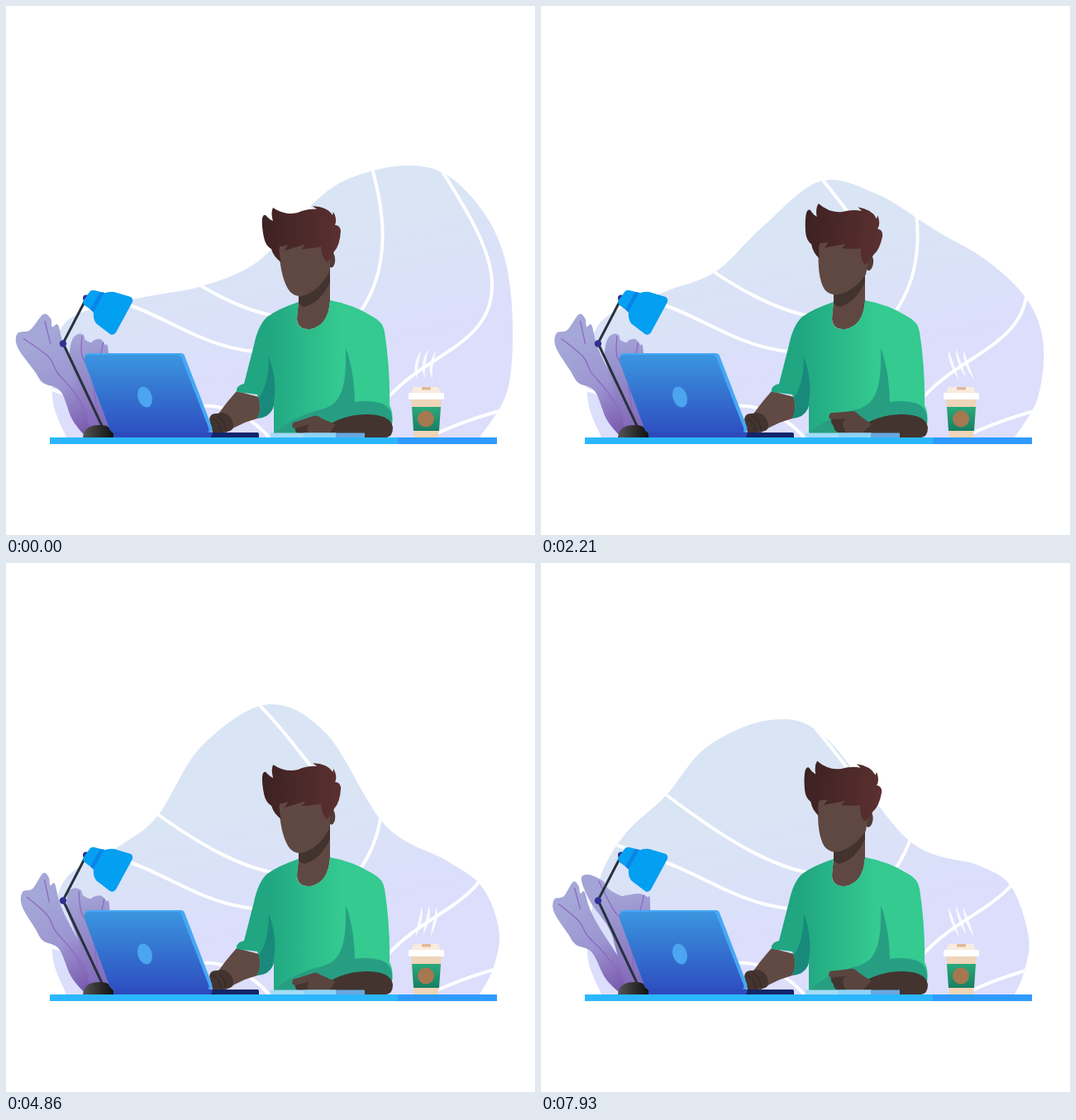
Recreate the animation shown at these times as an HTML page. Size 640 by 640 pixels, loop 8 s.

```html
<!DOCTYPE html>
<html lang="en">
<head>
<meta charset="utf-8">
<title>At the desk</title>
<style>
html, body { margin: 0; width: 100%; height: 100%; overflow: hidden; background: #fff; }
svg { display: block; width: 100%; height: 100%; }
</style>
</head>
<body>
<svg viewBox="0 0 640 640">
  <defs>
    <linearGradient id="sky" gradientUnits="userSpaceOnUse" x1="290" y1="280" x2="330" y2="450">
      <stop offset="0" stop-color="#d9e5f4"/><stop offset="1" stop-color="#dcdefc"/>
    </linearGradient>
    <linearGradient id="leafA" gradientUnits="userSpaceOnUse" x1="35" y1="410" x2="105" y2="510">
      <stop offset="0" stop-color="#a4a7d7"/><stop offset=".5" stop-color="#9c95d1"/><stop offset="1" stop-color="#7a59ae"/>
    </linearGradient>
    <linearGradient id="leafB" gradientUnits="userSpaceOnUse" x1="90" y1="400" x2="115" y2="515">
      <stop offset="0" stop-color="#a3a4d6"/><stop offset="1" stop-color="#8167b7"/>
    </linearGradient>
    <linearGradient id="lid" x1="0" y1="0" x2="0" y2="1">
      <stop offset="0" stop-color="#3b95df"/><stop offset="1" stop-color="#2e50c1"/>
    </linearGradient>
    <linearGradient id="shirt" gradientUnits="userSpaceOnUse" x1="315" y1="0" x2="405" y2="0">
      <stop offset="0" stop-color="#20a681"/><stop offset="1" stop-color="#34ca90"/>
    </linearGradient>
    <linearGradient id="hair"><stop offset="0" stop-color="#3d2122"/><stop offset="1" stop-color="#5b3030"/></linearGradient>
    <linearGradient id="base"><stop offset="0" stop-color="#555"/><stop offset=".6" stop-color="#292929"/><stop offset="1" stop-color="#111"/></linearGradient>
    <linearGradient id="sleeve" x1="0" y1="0" x2="0" y2="1"><stop offset="0" stop-color="#2ba97b"/><stop offset="1" stop-color="#187f62"/></linearGradient>
    <clipPath id="clip"><path id="blob"/></clipPath>
  </defs>

  <g clip-path="url(#clip)">
    <rect width="640" height="522" fill="url(#sky)"/>
    <g fill="none" stroke="#fff" stroke-width="4">
      <path d="M70 335Q88 339 150 362C200 380 240 412 300 418"/>
      <path d="M140 272L151 280C210 325 270 365 325 375"/>
      <path d="M300 165C330 195 350 222 372 250"/>
      <path d="M441 190C462 260 462 320 430 368"/>
      <path d="M525 196C560 250 590 300 588 342C585 410 510 420 462 474"/>
      <path d="M515 520Q550 503 600 489"/>
      <path d="M50 463Q62 465 75 472M236 484C270 482 300 500 320 524"/>
    </g>
  </g>

  <path id="a" fill="url(#leafA)"/>
  <path id="b" fill="url(#leafB)"/>
  <path id="veins" fill="none" stroke="#8c68c2" stroke-width="1.3" stroke-linecap="round"/>

  <g>
    <path d="M117 510L69 408L97 354" fill="none" stroke="#28323d" stroke-width="3"/>
    <circle cx="69" cy="408.500" r="4.200" fill="#2f3192"/>
    <circle cx="97" cy="353.500" r="4" fill="#2f3192"/>
    <path d="M93 522Q94 507 113 507Q129 506 131 522Z" fill="url(#base)"/>
    <path d="M101 346Q103 343 107 344L119 347L106 370L95 362Q92 359 94 356Z" fill="#05a0f2"/>
    <path d="M114 346L120 347L106 371L102 367Z" fill="#0a83e8"/>
    <path d="M118 348Q124 345 131 346L151 352Q154 354 153 358L133 395Q130 399 126 397L109 384Q105 378 106 370Z" fill="#039ff0"/>
  </g>

  <g>
    <path d="M354 340L392 315V357Q390 387 368 391Q352 392 352 377L354 357Z" fill="#5f4842"/>
    <path d="M354 347Q380 345 392 318V334Q380 360 360 364L354 360Z" fill="#43332e"/>
    <path d="M279 466Q262 485 255 497Q248 510 266 516Q285 504 304 499Q310 490 306 473Z" fill="#614a43"/>
    <path d="M354 358Q330 366 316 376Q305 386 300 410L288 457Q278 459 279 467L304 470Q311 485 304 499Q318 497 324 484V517H392L400 505Q430 497 467 506Q469 492 464 483Q465 440 458 394Q456 382 444 376Q420 361 392 356Q390 387 368 391Q352 392 352 378Z" fill="url(#shirt)"/>
    <path d="M318 424Q327 450 325 470L323 487Q318 498 304 499Q310 488 306 474Q318 458 318 424Z" fill="#18897a"/>
    <path d="M411 414C412 455 408 480 385 487Q345 497 324 517H392L405 505Q440 490 467 506Q469 487 455 481Q440 476 422 479Q421 440 411 414Z" fill="#279e82"/>
    <path d="M246 500Q247 492 256 493Q264 490 271 497Q277 505 274 512Q270 517 250 516Z" fill="#43342f"/>
    <path d="M256 496Q265 501 266 513M250 499Q259 504 260 514" fill="none" stroke="#2f2421"/>
    <path d="M382 513Q403 495 435 494Q466 494 468 510Q468 521 460 522H400L384 518Z" fill="#43342f"/>
    <g id="hand">
      <path d="M349 495Q349 491 356 492L378 490Q382 491 385 495L400 506L388 517H363Q354 515 354 508Q350 504 351 500Q347 498 349 495Z" fill="#5a443e"/>
      <path d="M352 500L369 499Q361 505 370 517H363Q354 515 354 508Q350 504 352 500Z" fill="#43342f"/>
    </g>
    <g id="head">
      <ellipse cx="393.500" cy="307" rx="4.700" ry="9.500" fill="#503b36"/>
      <path d="M330 288Q331 325 341 342Q346 351 357 351Q377 347 391 322L393 298L385 282L345 280Z" fill="#5f4842"/>
      <path d="M310 257Q311 252 314 253Q318 258 323 260Q320 250 323 244Q338 254 353 250Q365 245 376 246L371 242Q389 243 395 253L396 249Q401 258 398 265Q404 265 405 272Q404 290 397 297Q394 306 388 310Q381 302 381 291Q374 293 358 294L362 288Q350 292 337 296L341 289Q335 291 331 291Q330 300 333 310Q324 304 321 294Q314 290 312 280Q309 265 310 257Z" fill="url(#hair)"/>
    </g>
  </g>

  <g>
    <path d="M101 420H211Q215 420 216 423L249 509Q251 516 244 516H132Q127 516 125 511L96 433Q92 420 101 420Z" fill="#46a8f5"/>
    <path d="M101 422H208Q211 422 212 425L245 510Q247 516 241 516H132Q127 516 125 511L96 433Q92 422 101 422Z" fill="url(#lid)"/>
    <ellipse cx="168" cy="473" rx="8.500" ry="12.800" transform="rotate(-18 168 473)" fill="#4ba5ef"/>
    <rect x="130" y="515.500" width="120" height="7" fill="#2d4bbd"/>
    <path d="M250 516H304Q306 516 306 518V522H248Z" fill="#14256a"/>
    <rect x="320" y="516.500" width="80" height="6" fill="#a3dcf7"/>
    <rect x="360" y="516.500" width="39" height="6" fill="#8ed3f7"/>
    <rect x="399" y="516.500" width="35" height="6" fill="#69a8e0"/>
  </g>

  <g>
    <path id="steam" fill="#fff" fill-opacity=".85"/>
    <path d="M490 475H527L523 522H494Z" fill="#efd5b9"/>
    <path d="M493 461H523L526 469H490Z" fill="#f9ebde"/>
    <rect x="503" y="461" width="11" height="3.500" rx="1" fill="#e2b797"/>
    <rect x="487" y="468" width="43" height="8" rx="1.500" fill="#fff"/>
    <path d="M491 485H526L524 514H493Z" fill="url(#sleeve)"/>
    <circle cx="508" cy="499.500" r="10" fill="#a67850"/>
  </g>
  <rect x="53" y="522" width="422" height="8" fill="#2bb7fd"/>
  <rect x="474" y="522" width="120" height="8" fill="#2e9bff"/>
</svg>
<script>
const LOOP = 8000, GROUND = 522;
const $ = id => document.getElementById(id);
const points = s => s.split(' ').map(p => p.split(',').map(Number));
const clamp = v => Math.max(0, Math.min(1, v));
const smooth = v => { v = clamp(v); return v * v * (3 - 2 * v); };
const mix = (p, q, k = 0.5) => [p[0] + (q[0] - p[0]) * k, p[1] + (q[1] - p[1]) * k];
const fmt = p => p[0].toFixed(2) + ' ' + p[1].toFixed(2);

// Stops that each outline point of the backdrop passes; it rests at its last one.
const STOPS = [0, 3200, 6000, 8000];
const blob = [
  '73,522', '56,470', '70,385',
  '150,356 145,343 135,340 100,328',
  '237,339 199,314 173,300 151,280',
  '305,309 252,248 225,205 200,223',
  '360,250 328,195 307,155 278,191',
  '410,211 405,235 375,186 344,213',
  '484,193 472,305 450,326 445,336',
  '540,209 540,353 530,366',
  '590,270 587,393 569,392',
  '611,350 606,433 590,453',
  '608,460 598,480 584,496',
  '573,522'
].map(points);

const leafA = points('97,522 80,500 66,466 45,456 34,441 14,413 14,396 29,392 45,373 54,378 56,388 63,386 69,408 80,432 100,470 122,522');
const leafB = points('104,522 90,465 81,440 77,422 80,404 87,397 94,398 96,404 103,407 107,404 114,403 120,410 124,420 130,522');

function travel(stops, t) {
  let i = 0;
  while (i < STOPS.length - 2 && t > STOPS[i + 1]) i++;
  const last = stops[stops.length - 1];
  return mix(stops[i] || last, stops[i + 1] || last, (t - STOPS[i]) / (STOPS[i + 1] - STOPS[i]));
}

// Catmull-Rom spline through the points.
function curve(pts) {
  const n = pts.length - 1;
  let d = 'M' + fmt(pts[0]);
  for (let i = 0; i < n; i++) {
    const a = pts[Math.max(0, i - 1)], b = pts[i], c = pts[i + 1], e = pts[Math.min(n, i + 2)];
    const c1 = [b[0] + (c[0] - a[0]) / 6, b[1] + (c[1] - a[1]) / 6];
    const c2 = [c[0] - (e[0] - b[0]) / 6, c[1] - (e[1] - b[1]) / 6];
    d += 'C' + fmt(c1) + ' ' + fmt(c2) + ' ' + fmt(c);
  }
  return d;
}

function drawPlant(t) {
  const sway = Math.sin(Math.PI * t / LOOP);
  const open = smooth((t - 3800) / 4000);
  // The front leaf gets narrower and sinks, more so towards its tip.
  const a = leafA.map(([x, y]) => {
    const h = (GROUND - y) / 150;
    return [x - h * (0.2 * sway * (x - 50) + 0.28 * open * (x - 22)), y + 13 * h * open];
  });
  // The back leaf spreads its two lobes.
  const b = leafB.map(([x, y]) => {
    const w = open * clamp((440 - y) / 45), off = x - 110;
    return [x + 1.3 * off * w, y - 0.9 * Math.abs(off) * w];
  });
  $('a').setAttribute('d', curve(a) + 'Z');
  $('b').setAttribute('d', curve(b) + 'Z');
  const core = mix(a[3], a[13]), root = [114, 520];
  $('veins').setAttribute('d',
    curve([mix(a[5], a[7]), mix(a[4], a[12]), core, mix(a[2], a[14]), root]) +
    curve([mix(a[8], core, 0.12), mix(a[8], core, 0.5)]) +
    curve([mix(b[5], b[8], 0.3), mix(b[2], b[8]), mix(b[1], b[12], 0.4), root]) +
    curve([mix(b[10], b[11], 0.6), mix(b[1], b[12], 0.65)]));
}

function drawSteam(t) {
  const w = 2 * Math.PI * (t + 370) / 5600;
  const c = Math.cos(w), s = Math.sin(w);
  let d = '';
  for (let i = 0; i < 3; i++) {
    const x = 498 + i * 9, y = i === 1 ? 414 : 416;
    const tip = [x + 5 * c, y], end = [x + 3 - 4.5 * c + 2.5 * s, y + 36];
    const side = o => [[x - 8 * s + 2 * c + o, y + 12], [x - 6 * s - 2 * c + o, y + 24]];
    const l = side(-2), r = side(3);
    d += `M${fmt(tip)}C${fmt(l[0])} ${fmt(l[1])} ${fmt(end)}C${fmt(r[1])} ${fmt(r[0])} ${fmt(tip)}Z`;
  }
  $('steam').setAttribute('d', d);
}

function draw(t) {
  $('blob').setAttribute('d', curve(blob.map(p => travel(p, t))) + 'Z');
  drawPlant(t);
  drawSteam(t);
  const nod = Math.pow(Math.abs(Math.sin(Math.PI * t / 4800)), 1.2);
  $('head').setAttribute('transform', `rotate(${7.6 * nod} 367 338)`);
  $('hand').setAttribute('transform', `rotate(${13 * (nod - 1)} 400 512)`);
}

const start = performance.now();
function tick() {
  draw((performance.now() - start) % LOOP);
  requestAnimationFrame(tick);
}
tick();
</script>
</body>
</html>
```
